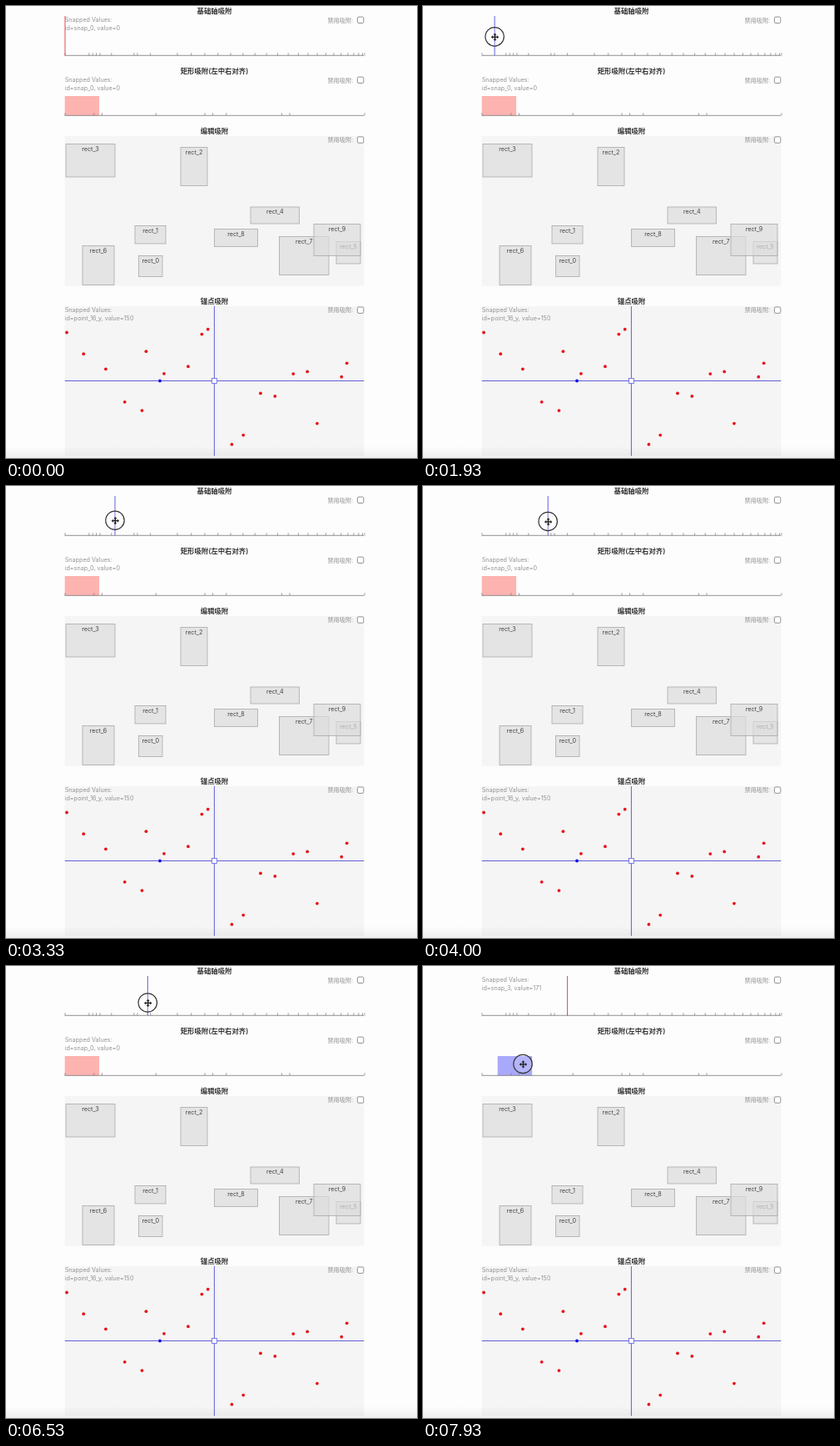
An HTML page with a canvas for the animation above (8 s loop, 494 by 542 pixels).

```html
<!DOCTYPE html>
<html lang="zh">
<head>
<meta charset="utf-8">
<title>Snapping</title>
<style>
  html, body { margin: 0; width: 100%; height: 100%; overflow: hidden; background: #fdfdfd; }
  canvas { display: block; width: 494px; height: 542px; }
</style>
</head>
<body>
<canvas id="stage"></canvas>
<script>
const W = 494, H = 542, LOOP = 8000;
const LEFT = 70.7, SPAN = 359.6, UNIT = 0.6, REACH = 5;
const FONT = 'Inter, "Noto Sans CJK SC", "Noto Sans CJK", sans-serif';
const BLUE = '#625edd', GREY = '#777', PALE = '#f5f5f5';

const series = (n, rule) => Array.from({ length: n }, (_, i) => rule(i));

// The ticks crowd together towards the right end.
const lineSnaps = [
  0, 138, 600, 171,
  ...series(20, i => 225 + 375 * (1 - (1 - i / 20) ** 1.5)),
  145, 93,
  ...series(4, i => 48 + 22 * i / 3)
];
const boxSnaps = [0, 182, 323, 600, ...[58, 280, 434].flatMap(v => [v, v + 16])];
const BOX_W = 69;

// x, y, width, height; the index gives the label
const rects = [
  [159.5, 299.5, 28.5, 25], [155, 263.5, 37, 21.5], [210, 169.5, 32, 46], [72, 165.5, 59, 39.5],
  [294, 241, 58.5, 20], [397, 282.5, 29, 26.5], [92, 287.5, 38, 47], [328.5, 276.5, 59.5, 46],
  [250.5, 267.5, 52, 21], [370, 261.5, 56, 38]
];

let seed = 16;
function random() {
  seed = (seed * 16807) % 2147483647;
  return seed / 2147483647;
}

// Scattered points, lower in the right half.
const points = series(19, i => {
  const x = 73 + 353 * (i + random()) / 19;
  return [x, 380 + 110 * random() + (x > 250 ? 37 : 0)];
});

// time, x, y of the pointer
const LINE_GRAB = 1500, LINE_DROP = 6900, BOX_GRAB = 7600;
const path = [
  [500, 20, 24], [LINE_GRAB, 71, 35], [2670, 112, 40], [4000, 150.2, 42.5], [4600, 155.3, 42.5],
  [5400, 155.3, 42.5], [6530, 170.3, 44], [LINE_DROP, 173.6, 44],
  [BOX_GRAB, 101, 117.5], [LOOP, 124, 117.5]
];

const canvas = document.getElementById('stage');
const ctx = canvas.getContext('2d');
const dpr = window.devicePixelRatio || 1;
canvas.width = W * dpr;
canvas.height = H * dpr;

const toX = v => LEFT + 0.3 + v * UNIT;
const toValue = x => (x - LEFT - 0.3) / UNIT;

function pointerAt(t) {
  const i = Math.max(1, path.findIndex(k => k[0] >= t));
  const [t0, x0, y0] = path[i - 1], [t1, x1, y1] = path[i];
  const p = (t - t0) / (t1 - t0);
  return { x: x0 + (x1 - x0) * p, y: y0 + (y1 - y0) * p };
}

// Moves the value so that one of its edges meets the nearest tick in reach.
function snap(value, ticks, edges) {
  let best = { value, id: -1, gap: REACH };
  ticks.forEach((tick, id) => edges.forEach(edge => {
    const gap = Math.abs(value + edge - tick);
    if (gap < best.gap) best = { value: tick - edge, id, gap, tick };
  }));
  return best;
}

function line(x0, y0, x1, y1, color, width) {
  ctx.strokeStyle = color;
  ctx.lineWidth = width;
  ctx.beginPath();
  ctx.moveTo(x0, y0);
  ctx.lineTo(x1, y1);
  ctx.stroke();
}

function box(x, y, w, h, fill, stroke) {
  ctx.fillStyle = fill;
  ctx.fillRect(x, y, w, h);
  if (!stroke) return;
  ctx.strokeStyle = stroke;
  ctx.lineWidth = 0.8;
  ctx.strokeRect(x, y, w, h);
}

function dot(x, y, r, color) {
  ctx.fillStyle = color;
  ctx.beginPath();
  ctx.arc(x, y, r, 0, Math.PI * 2);
  ctx.fill();
}

function text(str, x, y, color, size = 7.2, align = 'left', weight = 400) {
  ctx.font = `${weight} ${size}px ${FONT}`;
  ctx.textAlign = align;
  ctx.fillStyle = color;
  ctx.fillText(str, x, y);
}

function header(title, titleY, optionY) {
  text(title, 250.5, titleY + 3.1, '#333', 8.4, 'center', 600);
  text('禁用吸附:', 386.4, optionY + 2.7, '#8e8e8e');
  ctx.fillStyle = '#fff';
  ctx.strokeStyle = GREY;
  ctx.lineWidth = 0.8;
  ctx.beginPath();
  ctx.roundRect(422.4, optionY - 3.7, 7.4, 7.4, 1.5);
  ctx.fill();
  ctx.stroke();
}

function status(id, value, y) {
  text('Snapped Values:', LEFT, y + 2.5, '#949494');
  text(`id=${id}, value=${Math.round(value)}`, LEFT, y + 12.3, '#949494');
}

function axis(y, ticks) {
  line(LEFT, y, LEFT + SPAN, y, GREY, 0.8);
  ticks.forEach(v => line(toX(v), y, toX(v), y - 3, GREY, 0.7));
}

function drawLineAxis(t) {
  const dragTime = Math.min(Math.max(t, LINE_GRAB), LINE_DROP);
  const hit = snap(toValue(pointerAt(dragTime).x), lineSnaps, [0]);
  const snapped = hit.id >= 0;
  header('基础轴吸附', 6, 16.8);
  if (snapped) status('snap_' + hit.id, hit.tick, 16.8);
  axis(59.3, lineSnaps);
  line(toX(hit.value), 12, toX(hit.value), 59.3, snapped ? '#e5484c' : BLUE, 1);
}

function drawBoxAxis(t) {
  const shift = pointerAt(Math.max(t, BOX_GRAB)).x - pointerAt(BOX_GRAB).x;
  const hit = snap(shift / UNIT, boxSnaps, [0, BOX_W / 2, BOX_W]);
  const snapped = hit.id >= 0;
  header('矩形吸附(左中右对齐)', 78, 88.8);
  if (snapped) status('snap_' + hit.id, hit.tick, 88.8);
  box(toX(hit.value) - 0.3, 108, BOX_W * UNIT, 23.3, snapped ? '#fdb3b0' : '#a9a9fb');
  axis(131.3, boxSnaps);
}

function drawEditor() {
  box(LEFT, 156, SPAN, 179.6, PALE);
  header('编辑吸附', 150, 160.5);
  rects.forEach(([x, y, w, h], i) => {
    box(x, y, w, h, 'rgba(221,221,221,.7)', '#aaa');
    text('rect_' + i, x + w / 2, y + 8.1, '#444', 7.2, 'center');
  });
}

function drawAnchors() {
  const cx = 250.4, cy = 449.5;
  box(LEFT, 360, SPAN, 179.5, PALE);
  header('锚点吸附', 353.5, 364.7);
  status('point_16_y', 150, 364.7);
  points.forEach(([x, y]) => dot(x, y, 1.9, '#ea1219'));
  line(LEFT, cy, LEFT + SPAN, cy, BLUE, 1);
  line(cx, 360, cx, 539.5, BLUE, 1);
  dot(185, cy, 1.9, '#1414e6');
  box(cx - 3, cy - 3, 6, 6, '#fff', BLUE);
}

function drawPointer({ x, y }) {
  dot(x, y, 11.2, 'rgba(255,255,255,.15)');
  ctx.strokeStyle = '#333';
  ctx.lineWidth = 1.2;
  ctx.stroke();
  ctx.save();
  ctx.translate(x + 0.4, y + 0.4);
  ctx.fillStyle = '#222';
  for (let i = 0; i < 4; i++) {
    ctx.rotate(Math.PI / 2);
    line(0, 0, 3.5, 0, '#222', 1.4);
    ctx.beginPath();
    ctx.moveTo(4.7, 0);
    ctx.lineTo(2.5, -2);
    ctx.lineTo(2.5, 2);
    ctx.fill();
  }
  ctx.restore();
}

function drawFooter() {
  const shade = ctx.createLinearGradient(0, H - 14, 0, H);
  shade.addColorStop(0, 'rgba(0,0,0,0)');
  shade.addColorStop(1, 'rgba(0,0,0,.06)');
  ctx.fillStyle = shade;
  ctx.fillRect(0, H - 14, W, 14);
}

function draw(t) {
  ctx.setTransform(dpr, 0, 0, dpr, 0, 0);
  box(0, 0, W, H, '#fdfdfd');
  drawLineAxis(t);
  drawBoxAxis(t);
  drawEditor();
  drawAnchors();
  drawFooter();
  if (t >= path[0][0]) drawPointer(pointerAt(t));
}

const start = performance.now();
function tick() {
  draw((performance.now() - start) % LOOP);
  requestAnimationFrame(tick);
}
tick();
</script>
</body>
</html>
```
